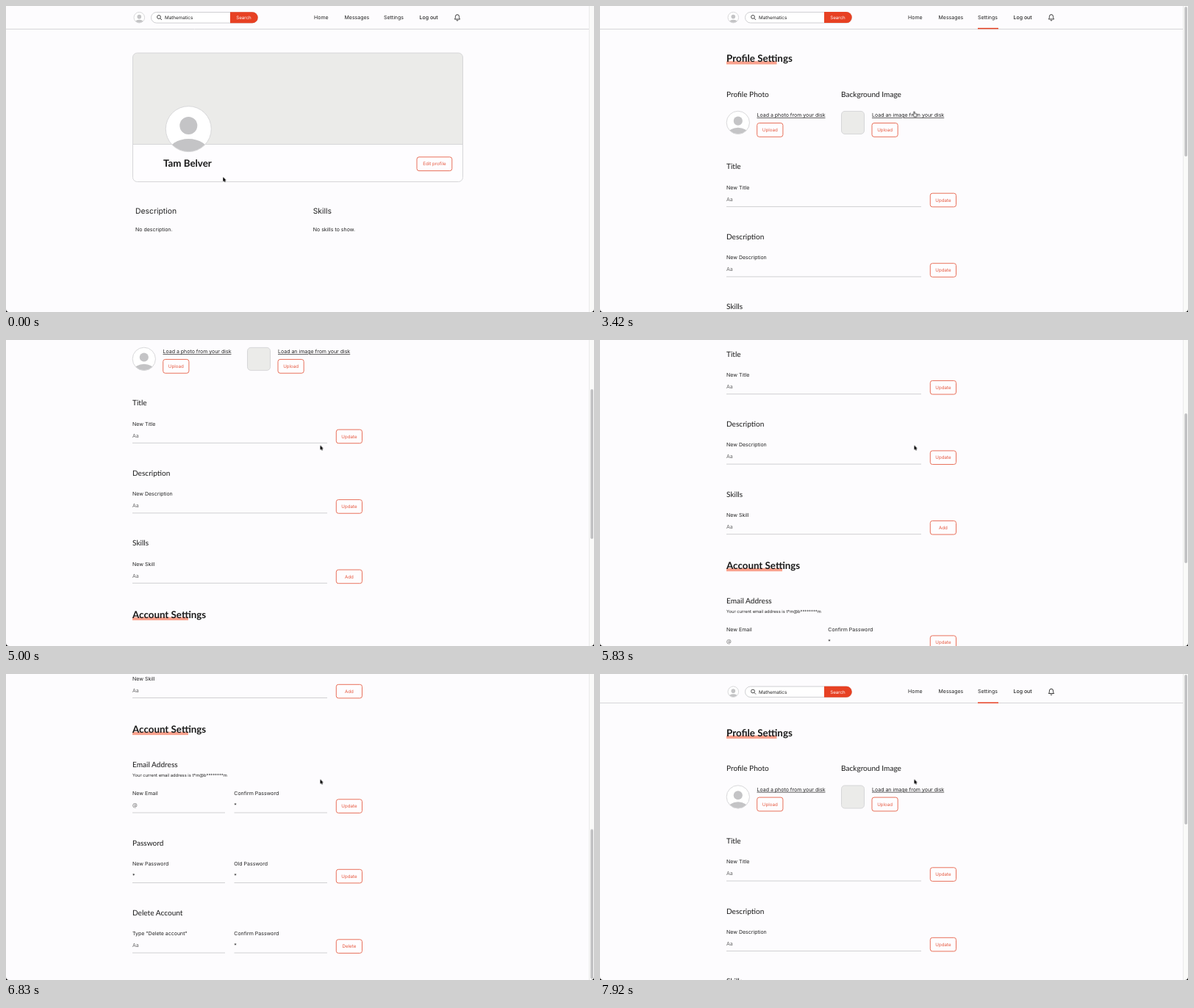
Recreate the animation shown at these times as an HTML page. Size 800 by 417 pixels, loop 8 s.

```html
<!DOCTYPE html>
<html lang="en">
<head>
<meta charset="utf-8">
<title>Profile settings</title>
<style>
html, body { margin: 0; width: 100%; height: 100%; overflow: hidden; background: #fdfcfe; }
svg { display: block; width: 800px; height: 417px; }
text { font: 7px Inter, Roboto, sans-serif; fill: #222; text-rendering: geometricPrecision; }
.h1 { font: 700 13.35px Lato, sans-serif; fill: #191919; }
.h2 { font: 10.1px Lato, sans-serif; fill: #191919; }
.big { font-size: 10.4px; }
.log { font-weight: 500; }
.field { font-size: 6.3px; }
.tiny { font-size: 5.8px; }
.hint { fill: #666; }
.link { text-decoration: underline; }
.btn { font-size: 6.2px; fill: #e5573d; text-anchor: middle; }
.box { fill: #fefdff; stroke: #e8705a; }
.rule { stroke: #d0d0d2; }
.mark { fill: #f9a18d; }
.edge { stroke: #d6d6d8; }

.home, .settings, .scroll, .thumb, .cursor, .arrow, .hand { animation: 8s linear infinite; }
.home { animation-name: home; animation-timing-function: step-end; }
.settings { animation-name: settings; animation-timing-function: step-end; }
.arrow { animation-name: arrow; animation-timing-function: step-end; }
.hand { animation-name: hand; animation-timing-function: step-end; }
.scroll { animation-name: scroll; }
.thumb { animation-name: thumb; }
.cursor { animation-name: move; }

@keyframes home { 0% { opacity: 1 } 31.25%, 100% { opacity: 0 } }
@keyframes settings { 0% { opacity: 0 } 31.25%, 100% { opacity: 1 } }
@keyframes arrow {
  0% { opacity: 1 } 25% { opacity: 0 } 31.25% { opacity: 1 }
  38.5% { opacity: 0 } 43.9%, 100% { opacity: 1 }
}
@keyframes hand {
  0% { opacity: 0 } 25% { opacity: 1 } 31.25% { opacity: 0 }
  38.5% { opacity: 1 } 43.9%, 100% { opacity: 0 }
}
@keyframes scroll {
  0%, 42.75% { transform: translateY(0) }
  52.125% { transform: translateY(-66.4px) }
  72.875% { transform: translateY(-199.8px); animation-timing-function: cubic-bezier(.4, .1, .65, .95) }
  83.5% { transform: translateY(-424px); animation-timing-function: ease-out }
  85.375% { transform: translateY(-432px); animation-timing-function: ease-in-out }
  88% { transform: translateY(-424px); animation-timing-function: cubic-bezier(.4, 0, .8, .8) }
  92.75% { transform: translateY(-60px) }
  94.2% { transform: translateY(0); animation-timing-function: ease-out }
  96% { transform: translateY(12px); animation-timing-function: ease-in-out }
  99%, 100% { transform: translateY(8.5px) }
}
@keyframes thumb {
  0%, 42.75% { transform: translateY(0) }
  52.125% { transform: translateY(33px) }
  72.875% { transform: translateY(99px); animation-timing-function: cubic-bezier(.4, .1, .65, .95) }
  83.5% { transform: translateY(210.5px) }
  88% { transform: translateY(210.5px); animation-timing-function: cubic-bezier(.4, 0, .8, .8) }
  92.75% { transform: translateY(30px) }
  94.2%, 100% { transform: translateY(0) }
}
@keyframes move {
  0% { transform: translate(295px, 233px) }
  3.1%, 5.2% { transform: translate(364px, 242px) }
  8.4%, 17.7% { transform: translate(421px, 235px) }
  21.9%, 23% { transform: translate(511px, 236px); animation-timing-function: ease-out }
  26% { transform: translate(571.5px, 210px) }
  29.1%, 31.5% { transform: translate(572px, 210px); animation-timing-function: cubic-bezier(.4, 0, .4, 1) }
  41.6%, 100% { transform: translate(427.5px, 143.5px) }
}
</style>
</head>
<body>
<svg viewBox="0 0 800 417" fill="none" xmlns="http://www.w3.org/2000/svg">
  <defs>
    <clipPath id="round"><circle r="31"/></clipPath>
    <g id="face">
      <circle r="31" fill="#fff"/>
      <g fill="#c4c4c6" clip-path="url(#round)">
        <circle cy="-4.5" r="12"/>
        <ellipse cy="31" rx="27" ry="17.5"/>
      </g>
      <circle r="31" stroke="#d8d8da" vector-effect="non-scaling-stroke"/>
    </g>
    <rect id="small" class="box" x="449.3" y="255.3" width="35.2" height="18.6" rx="3"/>
    <g id="wide">
      <path class="rule" d="M172 273.5H437"/>
      <use href="#small"/>
    </g>
    <g id="pair">
      <path class="rule" d="M172 273.5H298M310.5 273.5H437"/>
      <use href="#small"/>
    </g>
    <g id="nav">
      <path class="edge" d="M0 31.5H793.5"/>
      <use href="#face" transform="translate(181.3 15.7) scale(.235)"/>
      <rect x="197.5" y="8.5" width="145" height="14.6" rx="7.3" fill="#fff" stroke="#cfcfd2"/>
      <path d="M305 8.2H335.2a7.5 7.5 0 0 1 0 15H305Z" fill="#e74123"/>
      <circle cx="208" cy="15" r="2.4" stroke="#333" stroke-width=".9"/>
      <path d="M209.8 16.8L212 19" stroke="#333" stroke-width=".9"/>
      <text class="field" x="216" y="18">Mathematics</text>
      <text class="btn" x="323.5" y="18" style="fill:#fff">Search</text>
      <text x="419" y="17.6">Home</text>
      <text x="460.5" y="17.6">Messages</text>
      <text x="514" y="17.6">Settings</text>
      <text class="log" x="562.5" y="17.6">Log out</text>
      <path d="M610.3 18C611.4 17 611.4 16 611.4 14.6a2.6 2.9 0 0 1 5.2 0C616.6 16 616.6 17 617.7 18ZM613 19.2a1 .9 0 0 0 2 0" stroke="#222" stroke-width=".9" stroke-linejoin="round"/>
    </g>
  </defs>

  <g class="home">
    <use href="#nav"/>
    <rect x="172.5" y="64" width="449" height="175.5" rx="6" fill="#fefdff"/>
    <path d="M172.5 188.5V70a6 6 0 0 1 6-6H615.5a6 6 0 0 1 6 6V188.5Z" fill="#ebebe9"/>
    <path class="edge" d="M172.5 188.5H621.5"/>
    <rect class="edge" x="172.5" y="64" width="449" height="175.5" rx="6"/>
    <use href="#face" x="248.3" y="167.6"/>
    <text class="h1" x="214" y="219">Tam Belver</text>
    <rect class="box" x="559" y="205.8" width="47.8" height="18.8" rx="3"/>
    <text class="btn" x="583" y="217.4">Edit profile</text>
    <text class="big" x="176" y="283.4">Description</text>
    <text x="176" y="306.8">No description.</text>
    <text class="big" x="417.7" y="283.4">Skills</text>
    <text x="417.7" y="306.8">No skills to show.</text>
  </g>

  <g class="settings">
    <g class="scroll">
      <use href="#nav"/>
      <path d="M514 30.7H542" stroke="#e74123" stroke-width="1.5"/>

      <rect class="mark" x="172" y="75.3" width="68.5" height="4.3"/>
      <text class="h1" x="172" y="76.2">Profile Settings</text>
      <text class="h2" x="172" y="123.7">Profile Photo</text>
      <use href="#face" transform="translate(187.8 159) scale(.505)"/>
      <text class="link" x="213.5" y="151.3">Load a photo from your disk</text>
      <rect class="box" x="213.7" y="159.6" width="35.2" height="18.8" rx="3"/>
      <text class="btn" x="231.3" y="171.2">Upload</text>
      <text class="h2" x="328" y="123.7">Background Image</text>
      <rect class="edge" x="328.5" y="143.5" width="31" height="31" rx="4.5" fill="#ebebe9"/>
      <text class="link" x="370" y="151.3">Load an image from your disk</text>
      <rect class="box" x="370" y="159.6" width="35.2" height="18.8" rx="3"/>
      <text class="btn" x="387.6" y="171.2">Upload</text>

      <g>
        <use href="#wide"/>
        <text class="h2" x="172" y="222.5">Title</text>
        <text x="172" y="249.7">New Title</text>
        <text class="hint" x="172" y="265.8">Aa</text>
        <text class="btn" x="466.9" y="266.8">Update</text>
      </g>
      <g transform="translate(0 95.5)">
        <use href="#wide"/>
        <text class="h2" x="172" y="222.5">Description</text>
        <text x="172" y="249.7">New Description</text>
        <text class="hint" x="172" y="265.8">Aa</text>
        <text class="btn" x="466.9" y="266.8">Update</text>
      </g>
      <g transform="translate(0 191)">
        <use href="#wide"/>
        <text class="h2" x="172" y="222.5">Skills</text>
        <text x="172" y="249.7">New Skill</text>
        <text class="hint" x="172" y="265.8">Aa</text>
        <text class="btn" x="466.9" y="266.8">Add</text>
      </g>

      <rect class="mark" x="172" y="510.8" width="76" height="4.3"/>
      <text class="h1" x="172" y="511.7">Account Settings</text>
      <g transform="translate(0 347.5)">
        <use href="#pair"/>
        <text class="h2" x="172" y="211.5">Email Address</text>
        <text class="tiny" x="172" y="224">Your current email address is t*m@b********m</text>
        <text x="172" y="249.7">New Email</text>
        <text class="hint" x="172" y="265.8">@</text>
        <text x="310.3" y="249.7">Confirm Password</text>
        <text x="310.3" y="265.8">*</text>
        <text class="btn" x="466.9" y="266.8">Update</text>
      </g>
      <g transform="translate(0 443)">
        <use href="#pair"/>
        <text class="h2" x="172" y="222.5">Password</text>
        <text x="172" y="249.7">New Password</text>
        <text x="172" y="265.8">*</text>
        <text x="310.3" y="249.7">Old Password</text>
        <text x="310.3" y="265.8">*</text>
        <text class="btn" x="466.9" y="266.8">Update</text>
      </g>
      <g transform="translate(0 538.5)">
        <use href="#pair"/>
        <text class="h2" x="172" y="222.5">Delete Account</text>
        <text x="172" y="249.7">Type "Delete account"</text>
        <text class="hint" x="172" y="265.8">Aa</text>
        <text x="310.3" y="249.7">Confirm Password</text>
        <text x="310.3" y="265.8">*</text>
        <text class="btn" x="466.9" y="266.8">Delete</text>
      </g>
    </g>
  </g>

  <rect x="793" width="7" height="417" fill="#fafaf9"/>
  <path d="M793.5 0V417" stroke="#ebebeb"/>
  <g class="settings">
    <rect class="thumb" x="795.3" y="1" width="3.7" height="204" rx="1.8" fill="#c1c1c3"/>
  </g>
  <path d="M0 413Q0 417 4 417H0ZM800 413Q800 417 796 417H800Z" fill="#000"/>

  <g class="cursor">
    <path class="arrow" d="M0 0V6.2L1.4 5 2.3 7 3.4 6.6 2.5 4.6H4.3Z" fill="#000" stroke="#fff" stroke-width=".5" paint-order="stroke"/>
    <path class="hand" d="M-.7 .8Q0-.3 .7 .8V3L3.2 3.5Q3.8 3.7 3.6 4.6L3 7.6H0L-1.8 5Q-1.8 4-.7 4.6Z" fill="#fff" stroke="#222" stroke-width=".8" stroke-linejoin="round"/>
  </g>
</svg>
</body>
</html>
```
